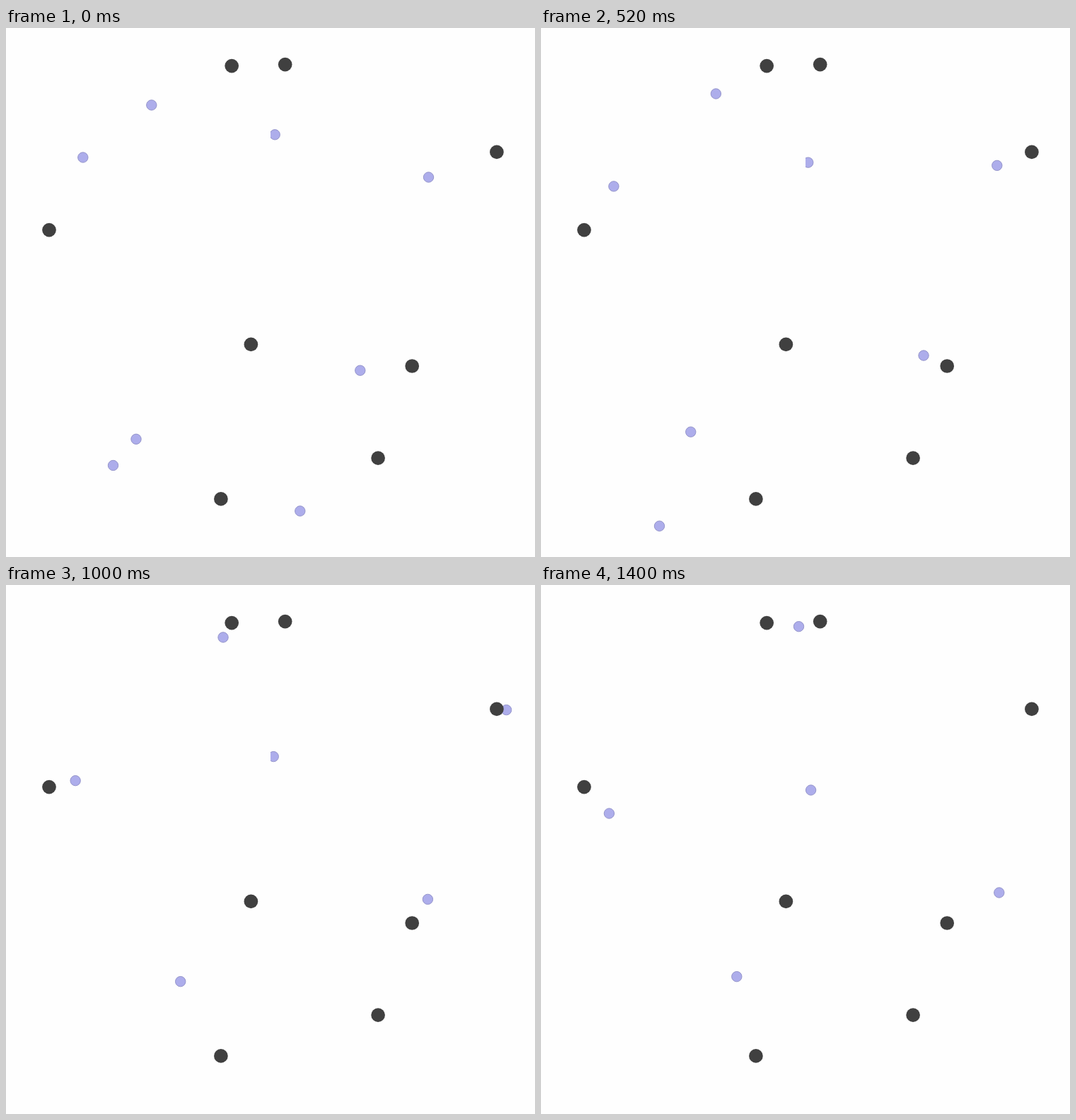
An HTML page with a canvas that plays this animation: 748 by 748 pixels, repeating every 1440 ms.

```html
<!DOCTYPE html>
<html lang="en">
<head>
<meta charset="utf-8">
<title>Drifting dots</title>
<style>
  html, body { margin: 0; width: 100%; height: 100%; overflow: hidden; background: #fefefe; }
  canvas { display: block; }
</style>
</head>
<body>
<canvas id="stage" width="748" height="748"></canvas>
<script>
const SIZE = 748, LOOP = 1440, STEP = 40;
const ctx = document.getElementById('stage').getContext('2d');

const anchors = [
  [319.2, 53.6], [394.7, 51.6], [693.9, 175.4], [61, 285.6],
  [346.4, 447.4], [574.2, 478], [526.1, 608.1], [303.9, 665.9]
];

// Each dot curves from its start, past a midway point, to its end.
const movers = [
  { start: [205.8, 109], mid: [266, 86.6], end: [364.5, 58.7] },
  { start: [108.8, 183], mid: [101, 241], end: [96.4, 323] },
  { start: [380.2, 150.8], mid: [377.5, 207], end: [381.6, 290], left: SIZE / 2 },
  { start: [597.5, 211], mid: [665, 188.2], end: [764, 164] },
  { start: [500.8, 484.2], mid: [558.6, 456], end: [647.8, 435] },
  { start: [184, 581.3], mid: [223.2, 567.4], end: [276.8, 553.7] },
  { start: [151.5, 618.5], mid: [174, 741], end: [204, 924] },
  { start: [415.8, 683], mid: [404.2, 791], end: [389, 934] }
];

// Dots leave almost at rest and approach cruising speed exponentially.
const TAU = 155;
const travel = t => t - 0.9 * TAU * (1 - Math.exp(-t / TAU));
const MID = travel(680), END = travel(1400);

// Parabola through the three key points.
function locate({ start, mid, end }, s) {
  return start.map((from, axis) => {
    const early = (mid[axis] - from) / MID;
    const whole = (end[axis] - from) / END;
    const bend = (whole - early) / (END - MID);
    return from + s * (early + bend * (s - MID));
  });
}

function disc(x, y, r, fill) {
  ctx.beginPath();
  ctx.arc(x, y, r, 0, 2 * Math.PI);
  ctx.fillStyle = fill;
  ctx.fill();
}

function drawMover(mover, s) {
  const { left = 0 } = mover;
  ctx.save();
  ctx.beginPath();
  ctx.rect(left, 0, SIZE - left, SIZE);
  ctx.clip();
  disc(...locate(mover, s), 7.2, '#adadeb');
  ctx.strokeStyle = '#8e8ec6';
  ctx.lineWidth = 0.9;
  ctx.stroke();
  ctx.restore();
}

function draw(t) {
  const s = travel(t);
  ctx.fillStyle = '#fefefe';
  ctx.fillRect(0, 0, SIZE, SIZE);
  movers.forEach(mover => drawMover(mover, s));
  anchors.forEach(([x, y]) => disc(x, y, 9.85, '#404040'));
}

const start = performance.now();
function tick() {
  const t = (performance.now() - start) % LOOP;
  draw(Math.floor(t / STEP) * STEP);
  requestAnimationFrame(tick);
}
tick();
</script>
</body>
</html>
```
